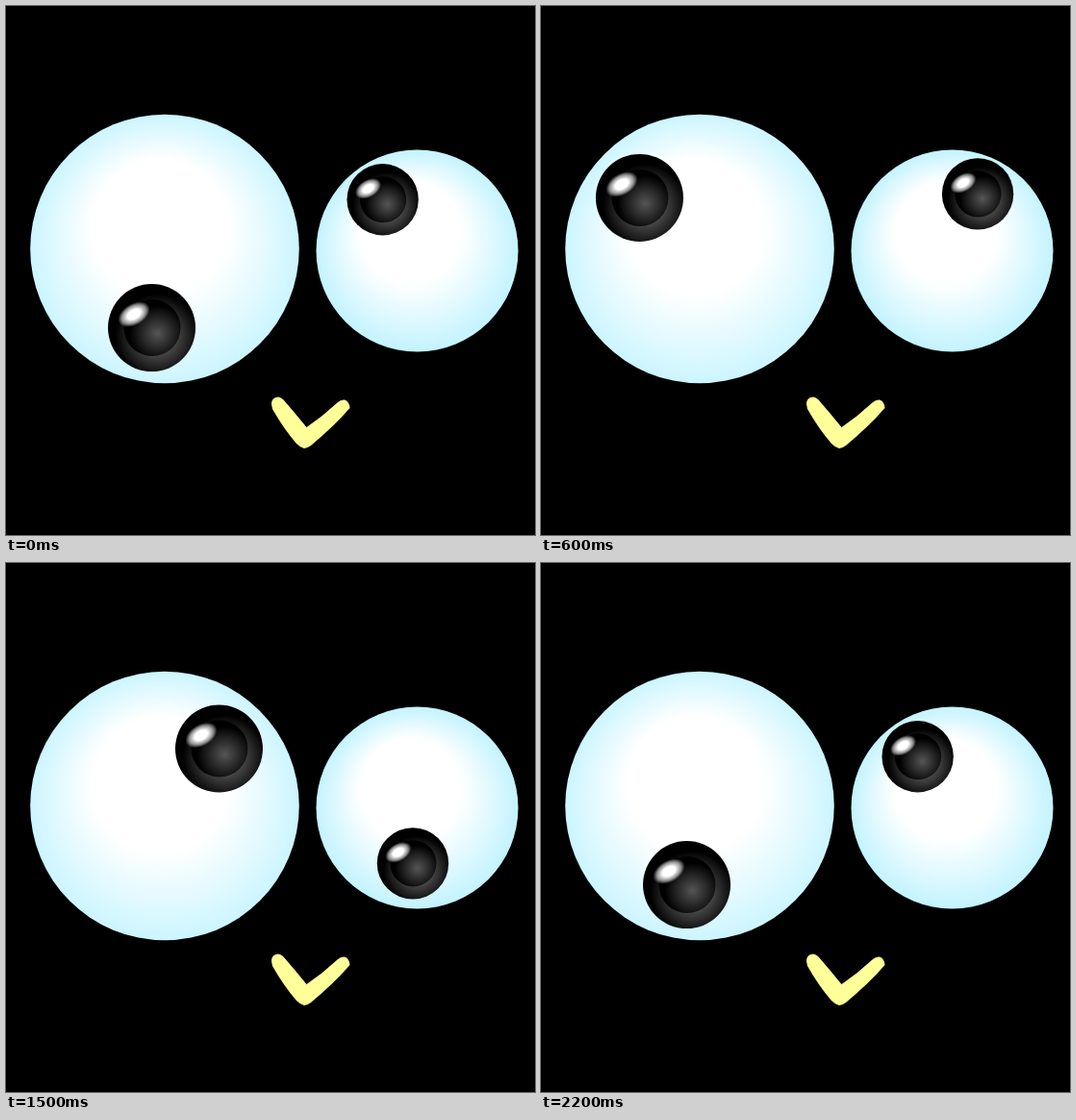
Write an HTML page with a canvas that moves like this. It is 550x550 px and loops after 2300 ms.

```html
<!DOCTYPE html>
<html lang="en">
<head>
<meta charset="utf-8">
<title>Rolling eyes</title>
<style>
html, body { margin: 0; width: 100%; height: 100%; overflow: hidden; background: #000; }
canvas { display: block; width: 550px; height: 550px; }
</style>
</head>
<body>
<canvas id="stage" width="550" height="550"></canvas>
<script>
const ctx = document.getElementById('stage').getContext('2d');
const STEP = 100, STEPS = 23;

// Pupil angles in degrees at the given steps
const times = [0, 2, 6, 10, 12, 15, 18, 22];
const eyes = [
  { x: 165, y: 252.5, r: 139.8, fx: 156, fy: 207, tint: '#ccf5ff',
    orbit: { x: 165, y: 253.2, r: 82.5 }, size: 1,
    angles: [99.4, 155.1, 220.7, 256.7, 275, 313.2, 360.2, 459.4] },
  { x: 427.5, y: 254.5, r: 105, fx: 414, fy: 216, tint: '#c3f3ff',
    orbit: { x: 427.8, y: 251, r: 61.5 }, size: 0.817,
    angles: [234, 254.2, 295.3, 344.3, 377, 454.5, 535.3, 594] }
];

// Slopes for a smooth curve through unevenly spaced points
function slopes(xs, ys) {
  const n = xs.length - 1;
  const h = [], d = [];
  for (let i = 0; i < n; i++) {
    h.push(xs[i + 1] - xs[i]);
    d.push((ys[i + 1] - ys[i]) / h[i]);
  }
  return xs.map((_, i) => {
    if (i === 0) return d[0] + (d[0] - d[1]) * h[0] / (h[0] + h[1]);
    if (i === n) return d[n - 1] + (d[n - 1] - d[n - 2]) * h[n - 1] / (h[n - 1] + h[n - 2]);
    return (d[i - 1] * h[i] + d[i] * h[i - 1]) / (h[i - 1] + h[i]);
  });
}

function curve(xs, ys, m, x) {
  let i = 0;
  while (i < xs.length - 2 && x >= xs[i + 1]) i++;
  const h = xs[i + 1] - xs[i], t = (x - xs[i]) / h, u = 1 - t;
  return u * u * ((1 + 2 * t) * ys[i] + t * h * m[i])
       + t * t * ((1 + 2 * u) * ys[i + 1] - u * h * m[i + 1]);
}

for (const e of eyes) e.m = slopes(times, e.angles);

function disc(x, y, r, fill) {
  ctx.fillStyle = fill;
  ctx.beginPath();
  ctx.arc(x, y, r, 0, Math.PI * 2);
  ctx.fill();
}

function radial(fx, fy, x, y, r, stops) {
  const g = ctx.createRadialGradient(fx, fy, 0, x, y, r);
  for (const [at, color] of stops) g.addColorStop(at, color);
  return g;
}

function drawPupil(x, y, size) {
  ctx.save();
  ctx.translate(x, y);
  ctx.scale(size, size);
  disc(0, 0, 45.5, radial(6, 9, 6, 9, 44, [[0, '#7c7c7c'], [1, '#000']]));
  disc(0.5, 0, 29.5, radial(6, 6, 6, 6, 29, [[0, '#555'], [1, '#000']]));
  ctx.translate(-18.5, -14);
  ctx.rotate(-Math.PI / 6);
  ctx.scale(1, 0.62);
  disc(0, 0, 18, radial(0, 0, 0, 0, 18, [
    [0, '#fff'], [0.4, '#fff'], [0.75, 'rgba(255,255,255,.55)'], [1, 'rgba(255,255,255,0)']
  ]));
  ctx.restore();
}

function drawEye(e, step) {
  disc(e.x, e.y, e.r, radial(e.fx, e.fy, e.x, e.y, e.r, [
    [0, '#fff'], [0.5, '#fff'], [1, e.tint]
  ]));
  const a = curve(times, e.angles, e.m, step) * Math.PI / 180;
  const o = e.orbit;
  drawPupil(o.x + o.r * Math.cos(a), o.y + o.r * Math.sin(a), e.size);
}

const beak = new Path2D(
  'M276 414 Q276 407 282.500 406.500 Q286 406.500 289 410 ' +
  'Q302 425 312.500 438 Q330 426 345 412 Q348 409 352 409.500 ' +
  'Q357 411 357.500 418 Q341 437 317 457 Q313 460 310 460 ' +
  'Q306 459 302 455 Q289 440 277 419 Z');

function draw(now) {
  const step = Math.min(Math.floor(now / STEP) % STEPS, 22);
  ctx.fillStyle = '#000';
  ctx.fillRect(0, 0, 550, 550);
  for (const e of eyes) drawEye(e, step);
  ctx.fillStyle = '#ffff99';
  ctx.fill(beak);
}

let start = null;
function tick(now) {
  if (start === null) start = now;
  draw(now - start);
  requestAnimationFrame(tick);
}
draw(0);
requestAnimationFrame(tick);
</script>
</body>
</html>
```
